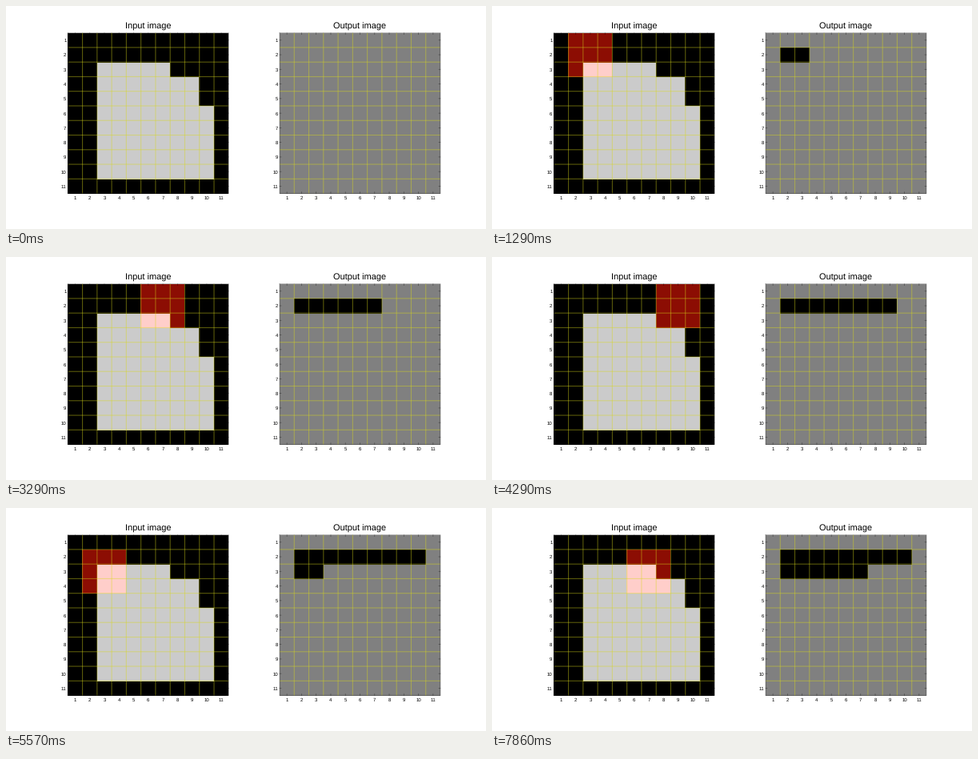
Write a matplotlib script that moves like this. It is 600 px wide and 279 px high and loops after 8000 ms.

```python
import numpy as np
import matplotlib.pyplot as plt
from matplotlib.animation import FuncAnimation

W, H, DPI = 600, 279, 72
N, TOP, SIDE = 11, 33.6, 201.0
CELL = SIDE / N
STEP_MS, STEPS = 500, 16
LIGHT, GRAY = (203, 203, 203), (128, 128, 128)
DARK_RED, PINK = (140, 13, 3), (255, 206, 202)

plt.rcParams.update({"font.family": "Liberation Sans",
                     "text.hinting": "none", "text.hinting_factor": 1})
fig = plt.figure(figsize=(W / DPI, H / DPI), dpi=DPI, facecolor="white")
ax = fig.add_axes([0, 0, 1, 1])
ax.axis("off")

# Binary shape: a block with a stepped upper right corner
shape = np.zeros((N, N), bool)
shape[2, 2:7] = True
shape[3:5, 2:9] = True
shape[5:10, 2:10] = True


def make_panel(left, title):
    """Draw grid, ticks and labels; return the image to be updated."""
    right, bottom = left + SIDE, TOP + SIDE
    image = ax.imshow(np.zeros((N, N, 3), np.uint8), aspect="auto",
                      interpolation="nearest", zorder=1,
                      extent=(left, right, bottom, TOP))
    offsets = np.arange(1, N) * CELL
    grid = dict(colors=(0.85, 0.85, 0.1), alpha=0.42, linewidth=1.1,
                snap=False, zorder=2)
    ax.vlines(left + offsets, TOP, bottom, **grid)
    ax.hlines(TOP + offsets, left, right, **grid)

    dark = dict(color="black", alpha=0.4, linewidth=0.7, snap=False, zorder=3)
    ax.plot([left, right, right, left, left],
            [TOP, TOP, bottom, bottom, TOP], **dark)
    label = dict(size=6.3, va="baseline")
    for i in range(N):
        mid = (i + 0.5) * CELL
        x, y = left + mid, TOP + mid
        for edge, inward in ((TOP, 2), (bottom, -2)):
            ax.plot([x, x], [edge, edge + inward], **dark)
        for edge, inward in ((left, 2), (right, -2)):
            ax.plot([edge, edge + inward], [y, y], **dark)
        ax.text(x, bottom + 7.5, i + 1, ha="center", **label)
        ax.text(left - 1.8, y + 2.4, i + 1, ha="right", **label)
    ax.text(left + SIDE / 2, 28.6, title, size=10.5,
            ha="center", va="baseline")
    return image


source_image = make_panel(77.3, "Input image")
result_image = make_panel(342.0, "Output image")
ax.set_xlim(0, W)
ax.set_ylim(H, 0)


def window(k):
    """3x3 neighbourhood of the k-th interior cell in reading order."""
    row, col = divmod(k, N - 2)
    return np.s_[row:row + 3, col:col + 3]


def update(step):
    source = np.zeros((N, N, 3), np.uint8)
    source[shape] = LIGHT
    result = np.full((N, N, 3), GRAY, np.uint8)
    for k in range(step):
        row, col = divmod(k, N - 2)
        result[row + 1, col + 1] = LIGHT if shape[window(k)].all() else 0
    if step:
        area = window(step - 1)
        source[area] = np.where(shape[area][..., None], PINK, DARK_RED)
    source_image.set_data(source)
    result_image.set_data(result)
    return source_image, result_image


anim = FuncAnimation(fig, update, frames=STEPS, interval=STEP_MS,
                     repeat=True, repeat_delay=0)
plt.show()
```
